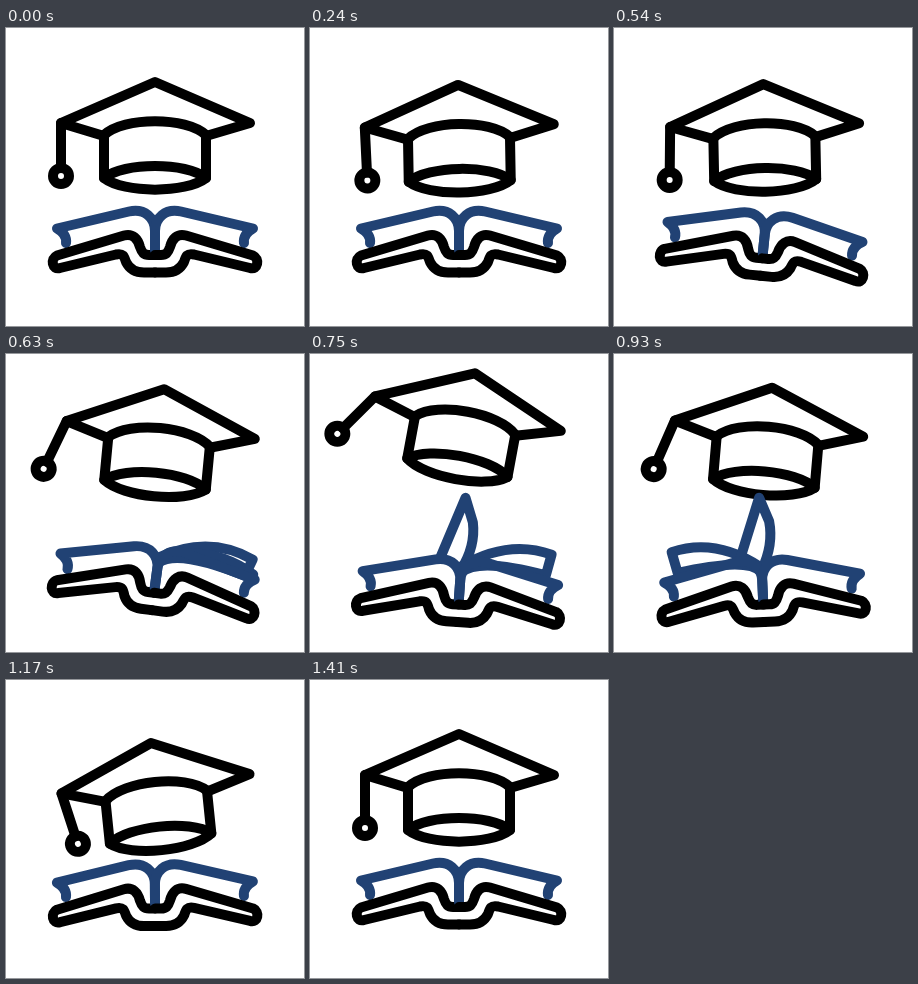
These frames come from a looping animation (298 px wide and 298 px high, 1.65 s). An HTML page:

```html
<!DOCTYPE html>
<html lang="en">
<head>
<meta charset="utf-8">
<title>Graduation cap and book</title>
<style>
  html, body { margin: 0; width: 100%; height: 100%; overflow: hidden; background: #fff; }
  svg { display: block; width: 100vw; height: 100vh; }
  path, circle { fill: none; stroke: #000; stroke-width: 10; stroke-linecap: round; stroke-linejoin: round; }
  .blue { stroke: #214274; }
</style>
</head>
<body>
<svg viewBox="0 0 298 298">
  <g id="cap">
    <path d="M98 108 L55 95 L149 54 L244 95 L200 108"/>
    <path d="M98 150 V107 C118 88.500 180 88.500 200 107 V150"/>
    <path d="M98 150 C118 134 180 134 200 150 C180 165.500 118 165.500 98 150 Z"/>
    <g id="tassel">
      <path d="M55 95 V140"/>
      <circle cx="55" cy="148" r="8"/>
    </g>
  </g>
  <g id="book">
    <path class="blue" id="pageA"/>
    <path class="blue" id="pageB"/>
    <g id="half">
      <path class="blue" d="M60 215 C61 208 57 204 51 200.500 L123 183.500 C139 180 149 190 149 203 V222"/>
      <path d="M149 227 H143 C138 227 136 225 134 219 C132 211 127 205 118 207.500 L51 227.500
        C44 230.500 46 242.500 54 240 L110 226.500 C117 225 118 228 120 234 C124 242 130 244.500 138 244.500 H149"/>
    </g>
    <use href="#half" transform="translate(298 0) scale(-1 1)"/>
  </g>
</svg>
<script>
const LOOP = 1650, STEP = 30;
const $ = id => document.getElementById(id);
const clamp = x => Math.min(1, Math.max(0, x));
const span = (f, a, b) => clamp((f - a) / (b - a));
const inOut = x => x < .5 ? 2 * x * x : 1 - 2 * (1 - x) ** 2;
const mix = (a, b, k) => a.map((v, i) => v + (b[i] - v) * k);

// The cap dips, jumps, dips and settles: [x, y, turn, tassel swing]
const rest = [0, 0, 0, 0];
const capPoses = [
  { at: 0, pose: rest },
  { at: 9, pose: [-1, 13, -4.5, -12.5] },
  { at: 21, pose: [8.5, -36, 10.7, 46] },
  { at: 33, pose: [0, 9, -6, -18.5] },
  { at: 42, pose: rest }
];

function capPose(f) {
  const i = Math.max(1, capPoses.findIndex(p => f <= p.at));
  const a = capPoses[i - 1], b = capPoses[i];
  return mix(a.pose, b.pose, inOut(span(f, a.at, b.at)));
}

// Outline of a turning page; 0 lies on the right, 1 on the left.
function pagePath(turn) {
  if (turn <= 0 || turn >= 1) return "";
  const c = Math.cos(turn * Math.PI), s = Math.sin(turn * Math.PI), flat = c * c;
  const far = [149 + 96 * c, 200 - 80 * s];
  const near = [149 + 91 * c + 9 * s ** 3, 199 - 55 * s * s];
  const root = [149 - 21 * s ** 3, 195 - 15 * s];
  const farBend = mix(mix(root, far, .5), [149 + 48 * c, 172 - 48 * s], flat);
  const nearBend = mix([162, 168], [149 + 18 * c, 180], flat);
  return `M${root} Q${farBend} ${far} L${near} Q${nearBend} 149 ${197 - 5 * s}`;
}

function draw(t) {
  const f = t < 180 ? 0 : Math.min(42, Math.floor((t - 150) / STEP));

  const [x, y, turn, swing] = capPose(f);
  $("cap").setAttribute("transform", `translate(${x} ${y}) rotate(${turn} 149.5 95)`);
  $("tassel").setAttribute("transform", `rotate(${swing - turn} 55 95)`);

  // The book sinks and comes back while its rocking dies down.
  const u = span(f, 10, 36);
  const sink = 27 * Math.sin(Math.PI * u) ** 2;
  const rock = 10 * (1 - u) * Math.sin(2 * Math.PI * u);
  $("book").setAttribute("transform", `translate(0 ${sink}) rotate(${rock} 149 220)`);

  // The first page starts fast, the second one ends fast.
  $("pageA").setAttribute("d", pagePath(1 - (1 - span(f, 15.4, 33)) ** 2.3));
  $("pageB").setAttribute("d", pagePath(span(f, 13, 30.6) ** 2.3));
}

const start = performance.now();
function tick() {
  draw((performance.now() - start) % LOOP);
  requestAnimationFrame(tick);
}
tick();
</script>
</body>
</html>
```
